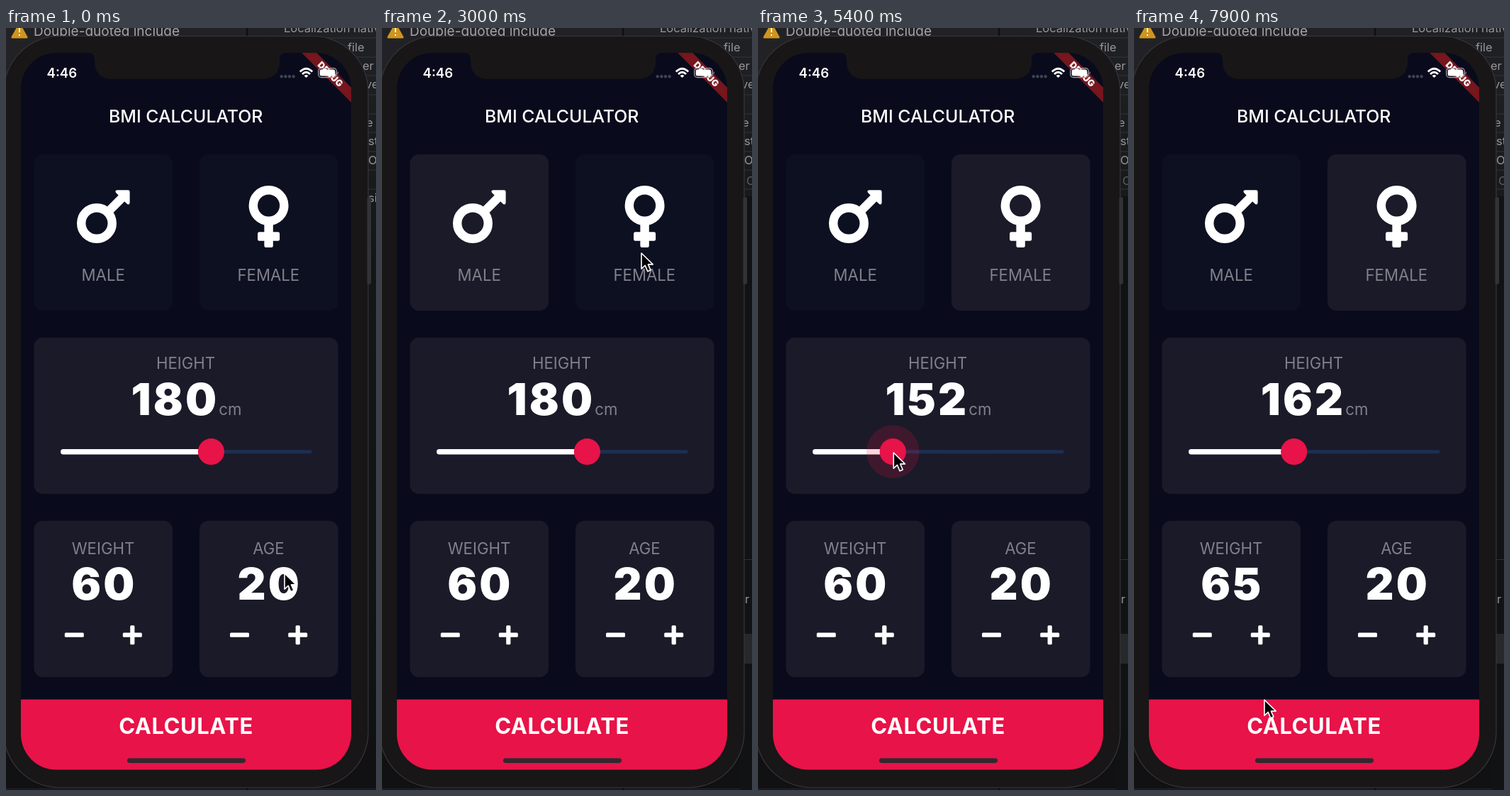
Recreate the animation shown at these times as an HTML page. Size 522 by 1073 pixels, loop 8 s.

```html
<!DOCTYPE html>
<html lang="en">
<head>
<meta charset="utf-8">
<title>BMI Calculator</title>
<style>
  html, body { margin: 0; width: 100%; height: 100%; overflow: hidden; background: #111214; }
  svg { display: block; width: 100%; height: 100%; font-family: Inter, "Open Sans", sans-serif; }
  .editor { font-size: 16.5px; fill: #96969a; }
  .label { font-size: 22.2px; fill: #80808a; text-anchor: middle; }
  .number { font-size: 62px; font-weight: 900; letter-spacing: 3.2px; fill: #fff; text-anchor: middle; }
  .unit { font-size: 22.2px; font-weight: 400; letter-spacing: 0; fill: #80808a; }
  .card { fill: #1b1a28; }
  .idle { fill: #0d1021; }
  .white { fill: #fff; }
  .accent { fill: #e81348; }
</style>
</head>
<body>
<svg viewBox="0 0 522 1073" preserveAspectRatio="none">
  <defs>
    <clipPath id="screenClip"><rect x="21" y="35" width="466" height="1009.6" rx="50"/></clipPath>
    <linearGradient id="strip" x2="0" y2="1">
      <stop offset="0" stop-color="#202124"/>
      <stop offset=".3" stop-color="#151618"/>
      <stop offset="1" stop-color="#101113"/>
    </linearGradient>
    <rect id="minus" x="-13.5" y="-3.1" width="27" height="6.2" rx="1.5"/>
    <g id="plus"><use href="#minus"/><use href="#minus" transform="rotate(90)"/></g>
  </defs>

  <!-- editor window behind the phone -->
  <rect width="340" height="1073" fill="#222226"/>
  <rect x="340" width="182" height="1073" fill="url(#strip)"/>
  <rect y="1000" width="522" height="73" fill="#111113"/>
  <path d="M0 1071.5H522" stroke="#29292b"/>
  <path d="M340 0V1073" stroke="#08080a" stroke-width="1.5"/>
  <path d="M19-5 29 13H9Z" fill="#cf9520" stroke="#cf9520" stroke-width="3" stroke-linejoin="round"/>
  <path d="M19 0V6M19 9V11" stroke="#fff" stroke-width="2"/>
  <g class="editor">
    <text x="39" y="11" font-size="19" fill="#a4a4a8">Double-quoted include</text>
    <text x="392" y="5.5">Localization nativ</text>
    <text x="482" y="33">file</text>
    <text x="503" y="59">er</text>
    <text x="507" y="85">ve</text>
    <text x="508" y="139">e c</text>
    <text x="511" y="165">st</text>
    <text x="511" y="192">O</text>
    <text id="before" x="511" y="245">si</text>
    <path d="M341 14H522M470 41H522M490 67H522M500 94H522M505 121H522M505 147H522M505 174H522M505 200H522M505 227H522" stroke="#34353a"/>
    <g id="after">
      <text x="514" y="221" fill="#5b5b60">C</text>
      <rect x="505" y="237" width="17" height="836" fill="#111214"/>
      <path d="M505 748.5H522" stroke="#303135"/>
      <text x="512" y="810">r</text>
      <rect x="505" y="853" width="17" height="42" fill="#27282b"/>
    </g>
  </g>

  <!-- phone -->
  <rect x="-3" y="11.5" width="514" height="1058" rx="78" fill="#181617" stroke="#363638" stroke-width="1.2"/>
  <rect x="509.5" y="238" width="5.5" height="123" rx="2.7" fill="#323336"/>
  <g clip-path="url(#screenClip)">
    <rect x="21" y="35" width="467" height="1010" fill="#090b1c"/>
    <rect class="accent" x="21" y="945.5" width="467" height="100"/>
    <g transform="translate(487.5 35) rotate(45)">
      <rect x="-60" y="34.8" width="120" height="14.9" fill="#76161d"/>
      <text y="46.8" font-size="12.7" font-weight="900" text-anchor="middle" class="white">DEBUG</text>
    </g>
    <path d="M116 34V35Q125 35 125 44V46Q125 72 151 72H360Q386 72 386 46V44Q386 35 395 35V34Z" fill="#181617"/>
  </g>

  <!-- status bar -->
  <text x="57.5" y="70" font-size="18.6" font-weight="600" class="white">4:46</text>
  <g fill="#3f4352">
    <circle cx="388.7" cy="68.2" r="2.2"/><circle cx="394.4" cy="68.2" r="2.2"/>
    <circle cx="400" cy="68.2" r="2.2"/><circle cx="405.6" cy="68.2" r="2.2"/>
  </g>
  <g fill="none" stroke="#fff" stroke-width="2.7">
    <path d="M414.8 61.5Q423.5 53 432.2 61.5"/>
    <path d="M418 65Q423.5 59.6 429 65"/>
    <path d="M420.6 67.2Q423.5 64.6 426.4 67.2L423.5 70Z" fill="#fff" stroke="none"/>
  </g>
  <rect x="440.7" y="56.6" width="25.5" height="13" rx="4" fill="none" stroke="#a9a4ab" stroke-width="1.2"/>
  <rect x="442.7" y="58.6" width="21.5" height="9" rx="2.3" class="white"/>
  <path d="M467.7 61Q470 63 467.7 65.5Z" fill="#a9a4ab"/>

  <text x="253.7" y="133" font-size="24.8" font-weight="500" text-anchor="middle" class="white">BMI CALCULATOR</text>

  <!-- cards -->
  <g class="card">
    <rect id="maleCard" x="39.5" y="178" width="195.5" height="220" rx="12.4"/>
    <rect id="femaleCard" x="273" y="178" width="195.5" height="220" rx="12.4"/>
    <rect x="39.5" y="436" width="429" height="220" rx="12.4"/>
    <rect x="39.5" y="694" width="195.5" height="220" rx="12.4"/>
    <rect x="273" y="694" width="195.5" height="220" rx="12.4"/>
  </g>
  <g class="white" transform="translate(100 215.9) scale(.1943)">
    <circle cx="144" cy="304" r="112" fill="none" stroke="#fff" stroke-width="64"/>
    <path d="M221 182 302 101 285 84Q272 66 293 64H372Q384 64 384 76V155Q381 176 363 163L346 146 265 227Z"/>
  </g>
  <g class="white" transform="translate(342.6 215.8) scale(.1943)">
    <circle cx="144" cy="176" r="112" fill="none" stroke="#fff" stroke-width="64"/>
    <rect x="112" y="300" width="64" height="180" rx="12"/>
    <rect x="64" y="368" width="160" height="64" rx="12"/>
  </g>
  <g class="label">
    <text x="137.2" y="356">MALE</text>
    <text x="370.3" y="356">FEMALE</text>
    <text x="253.5" y="480">HEIGHT</text>
    <text x="137" y="741">WEIGHT</text>
    <text x="370.5" y="741">AGE</text>
  </g>

  <text class="number" x="254.5" y="545"><tspan id="height">180</tspan><tspan class="unit">cm</tspan></text>
  <rect x="77" y="594.2" width="354.5" height="5" rx="2.5" fill="#1c2f53"/>
  <rect id="track" x="77" y="593" width="212" height="7.4" rx="3.7" class="white"/>
  <g id="knob">
    <circle id="halo" r="37.3" class="accent" opacity="0"/>
    <circle r="18.6" class="accent"/>
  </g>

  <circle id="ripple" cx="178.3" cy="854.5" r="35" fill="#9a9ab8" opacity="0"/>
  <text class="number" id="weight" x="138.5" y="805">60</text>
  <text class="number" x="371.7" y="805">20</text>
  <g class="white">
    <use href="#minus" x="96.3" y="854.7"/><use href="#plus" x="178.3" y="854.7"/>
    <use href="#minus" x="329.5" y="854.7"/><use href="#plus" x="411.7" y="854.7"/>
  </g>

  <text x="254" y="994" font-size="30.9" font-weight="700" letter-spacing=".6" text-anchor="middle" class="white">CALCULATE</text>
  <rect x="171" y="1028.3" width="167" height="6.6" rx="3.3" fill="#33282f"/>

  <path id="cursor" d="M0 1V23.2L5.2 18.4 8.8 26.8 12.9 24.9 9.4 16.9H16.2Z" fill="#000" stroke="#fff" stroke-width="1.6" stroke-linejoin="round"/>
</svg>
<script>
  const LOOP = 8000, STEP = 100;
  const MALE_TAP = 2100, FEMALE_TAP = 3100, GRAB = 4700, RELEASE = 6100;
  const TAPS = [6700, 6950, 7200, 7400, 7600];
  // rows of time, x, y
  const POINTER = [
    [0, 393, 767], [300, 385, 745], [1000, 232, 470], [1200, 215, 440], [1700, 146, 328],
    [2600, 146, 328], [3000, 366, 316], [3900, 366, 316], [4400, 281, 582], [4700, 288, 597],
    [6100, 227, 597], [6600, 178, 857], [7600, 178, 857], [7900, 184, 945]
  ];
  // rows of time, centimetres
  const HEIGHT = [[4700, 180], [5000, 137], [5200, 139], [5600, 164], [5900, 162]];
  const el = id => document.getElementById(id);
  const parts = Object.fromEntries(['before', 'after', 'maleCard', 'femaleCard', 'height', 'track',
    'knob', 'halo', 'ripple', 'weight', 'cursor'].map(id => [id, el(id)]));
  const clamp = v => Math.min(1, Math.max(0, v));
  const ease = v => v * v * (3 - 2 * v);

  function sample(rows, t, column) {
    const next = rows.findIndex(row => row[0] > t);
    if (next === 0) return rows[0][column];
    if (next < 0) return rows[rows.length - 1][column];
    const a = rows[next - 1], b = rows[next];
    return a[column] + (b[column] - a[column]) * ease((t - a[0]) / (b[0] - a[0]));
  }

  function draw(t) {
    const windowChanged = t >= MALE_TAP;
    parts.before.style.display = windowChanged ? 'none' : '';
    parts.after.style.display = windowChanged ? '' : 'none';
    parts.maleCard.classList.toggle('idle', t < MALE_TAP || t >= FEMALE_TAP);
    parts.femaleCard.classList.toggle('idle', t < FEMALE_TAP);

    const cm = Math.round(sample(HEIGHT, t, 1));
    const knobX = 77 + (cm - 120) * 3.54;
    parts.height.textContent = cm;
    parts.track.setAttribute('width', knobX - 77);
    parts.knob.setAttribute('transform', `translate(${knobX} 596.6)`);
    const press = clamp((t - GRAB + STEP) / 200) * clamp((RELEASE + STEP - t) / 200);
    parts.halo.setAttribute('opacity', .18 * press);
    parts.halo.setAttribute('r', 18.6 + 18.7 * press);

    const taps = TAPS.filter(time => time <= t);
    parts.weight.textContent = 60 + taps.length;
    const sinceTap = t - (taps[taps.length - 1] ?? -LOOP);
    parts.ripple.setAttribute('opacity', .08 * clamp((300 - sinceTap) / 150));

    const dragging = t >= GRAB && t < RELEASE;
    const x = dragging ? knobX + (t < 5200 ? -1 : 1) : sample(POINTER, t, 1);
    parts.cursor.setAttribute('transform', `translate(${x} ${sample(POINTER, t, 2)})`);
  }

  const start = performance.now();
  function frame() {
    const elapsed = performance.now() - start + 8;
    draw(Math.floor(elapsed % LOOP / STEP) * STEP);
    requestAnimationFrame(frame);
  }
  frame();
</script>
</body>
</html>
```
